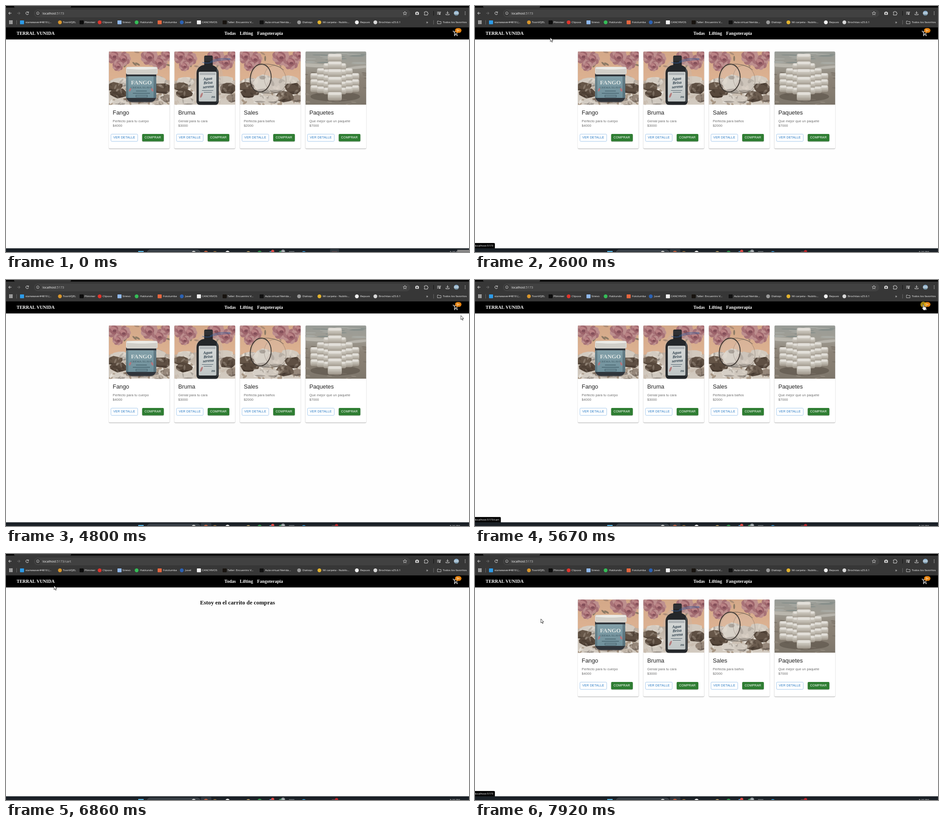
An HTML page with a canvas for the animation above (7.99 s loop, 1026 px wide and 546 px high).

```html
<!DOCTYPE html>
<html lang="es">
<head>
<meta charset="utf-8">
<title>Tienda</title>
<style>
html, body { margin: 0; width: 100%; height: 100%; overflow: hidden; background: #fff; }
canvas { display: block; width: 1026px; height: 546px; }
</style>
</head>
<body>
<canvas id="stage" width="1026" height="546"></canvas>
<script>
const W = 1026, H = 546, LOOP = 7990, STEP = LOOP / 120;
const UI = '"Open Sans", "Noto Sans", sans-serif';
const SANS = '"Liberation Sans", Arial, sans-serif';
const SERIF = '"Liberation Serif", "Times New Roman", serif';
const stage = document.getElementById('stage').getContext('2d');
let g = stage;

function box(x, y, w, h, fill, r = 0, stroke) {
  g.beginPath();
  g.roundRect(x, y, w, h, r);
  if (fill) { g.fillStyle = fill; g.fill(); }
  if (stroke) { g.strokeStyle = stroke; g.stroke(); }
}

function oval(x, y, rx, ry, fill, turn = 0, stroke) {
  g.beginPath();
  g.ellipse(x, y, rx, ry, turn, 0, 7);
  if (fill) { g.fillStyle = fill; g.fill(); }
  if (stroke) { g.strokeStyle = stroke; g.stroke(); }
}

const dot = (x, y, r, fill, stroke) => oval(x, y, r, r, fill, 0, stroke);

function line(d, color, width = 1) {
  g.strokeStyle = color;
  g.lineWidth = width;
  g.stroke(new Path2D(d));
}

function text(s, x, y, font, color, align = 'left', gap = 0) {
  g.font = font;
  g.letterSpacing = gap + 'px';
  g.textAlign = align;
  g.fillStyle = color;
  g.fillText(s, x, y);
  g.letterSpacing = '0px';
}

function fade(y0, y1, ...colors) {
  const f = g.createLinearGradient(0, y0, 0, y1);
  colors.forEach((c, i) => f.addColorStop(i / (colors.length - 1), c));
  return f;
}

function seeded(seed) {
  return () => (seed = (seed * 16807) % 2147483647) / 2147483647;
}

// Product pictures, drawn in a 135 x 118 area

function rose(x, y, r) {
  for (let i = 0; i < 9; i++) {
    const a = i * 0.7;
    oval(x + Math.cos(a) * r * 0.55, y + Math.sin(a) * r * 0.5, r * 0.5, r * 0.42,
      i % 2 ? '#a87378' : '#bd8f8e', a);
  }
  dot(x, y, r * 0.55, '#9d646b');
  oval(x - 1, y - 2, r * 0.45, r * 0.28, '#b98184', 0.5);
  oval(x + 1, y + 2, r * 0.25, r * 0.18, '#85505a');
}

function rock(x, y, rx, ry, color, seed) {
  const rnd = seeded(seed * 971 + 7);
  g.beginPath();
  for (let i = 0; i < 11; i++) {
    const a = i * Math.PI / 5.5, k = 0.82 + rnd() * 0.28;
    g.lineTo(x + Math.cos(a) * rx * k, y + Math.sin(a) * ry * k);
  }
  g.fillStyle = color;
  g.fill();
  g.save();
  g.clip();
  for (let i = 0; i < 8; i++)
    oval(x + (rnd() - 0.5) * rx * 2, y + (rnd() - 0.5) * ry * 2, rx * 0.3, ry * 0.2,
      i % 2 ? 'rgba(255,245,230,.2)' : 'rgba(20,14,10,.16)', rnd() * 3);
  oval(x, y + ry, rx, ry * 0.5, 'rgba(25,18,12,.25)');
  g.restore();
}

function tableScene(seed, shift) {
  const rnd = seeded(seed);
  box(0, 0, 135, 118, fade(0, 118, '#d3a888', '#dcb191', '#c09c80'));
  for (let i = 0; i < 12; i++)
    oval(rnd() * 135, rnd() * 34, 6, 2, i % 2 ? '#8c7a65' : '#ad8d77', rnd() * 3);
  rose(12 + shift, 10, 18);
  rose(32 + shift, 16, 16);
  rose(20 + shift, 32, 12);
  rose(90 + shift, 12, 19);
  rose(112 + shift, 24, 17);
  rose(130 + shift, 8, 14);
  g.beginPath();
  g.moveTo(0, 65);
  g.quadraticCurveTo(67, 54, 135, 64);
  g.lineTo(135, 118);
  g.lineTo(0, 118);
  g.fillStyle = fade(58, 118, '#b8a797', '#cdc3b7', '#d3cbc1');
  g.fill();
  for (let i = 0; i < 90; i++)
    oval(rnd() * 135, 64 + rnd() * 54, 2 + rnd() * 5, 1 + rnd() * 2,
      ['#e6e1d9', '#a79684', '#c9bdb0'][i % 3], rnd() * 3);
  rock(24, 68, 22, 11, '#d3cbc1', seed);
  rock(110, 65, 21, 12, '#d2c9be', seed + 4);
  rock(13, 78, 19, 10, '#665648', seed + 1);
  rock(22, 93, 20, 11, '#57483c', seed + 2);
  rock(118, 82, 20, 13, '#5e4f43', seed + 3);
  rock(128, 104, 14, 9, '#96877a', seed + 5);
}

function jar() {
  tableScene(31, 0);
  oval(72, 107, 39, 8, 'rgba(40,28,20,.35)');
  box(38, 44, 67, 68, '#30353b', [4, 4, 13, 13]);
  box(38, 55, 67, 48, fade(55, 103, '#829fa8', '#6f909b'), 2);
  box(38, 55, 5, 48, 'rgba(30,45,55,.25)');
  box(99, 55, 6, 48, 'rgba(30,45,55,.3)');
  box(38, 34, 70, 17, '#dad8d2', 4);
  for (let x = 41; x < 107; x += 3) box(x, 39, 0.8, 11, '#b9b8b2');
  oval(73, 37, 34, 3, '#ecebe6');
  text('FANGO', 72, 73, 'bold 13px ' + SERIF, '#e3e8e6', 'center');
  text('CREMA SUAVE', 72, 82, '6.8px ' + SERIF, '#3c5661', 'center');
  box(60, 87, 24, 1.2, '#405b66');
  box(53, 92, 38, 1.2, '#405b66');
  box(60, 97, 25, 4, null, 0, '#465f69');
  oval(47, 85, 2, 4, '#b8747a', 0.4);
  oval(96, 85, 2, 4, '#b8747a', -0.4);
  rock(24, 112, 16, 7, '#d3ccc3', 8);
  rock(110, 114, 14, 6, '#c1b5a8', 9);
}

function bottle() {
  tableScene(57, 2);
  oval(75, 67, 33, 55, 'rgba(195,183,173,.3)', 0.08);
  box(66, 9, 19, 25, '#25272a', 3);
  for (let x = 68; x < 84; x += 3) box(x, 11, 0.8, 10, '#4a4b4e');
  box(49, 30, 49, 89, '#24272a', [18, 18, 8, 8]);
  box(54, 45, 39, 66, fade(45, 111, '#d6d9d8', '#c0c6c6'), 2);
  box(94, 37, 2, 75, 'rgba(210,220,225,.3)', 1);
  line('M62 24 Q74 28 85 23 T124 18 M79 23 Q96 13 124 16', '#315e9f', 1);
  line('M56 48 H91 M56 51 H91', '#56616a', 0.8);
  g.save();
  g.translate(74, 63);
  g.rotate(-0.08);
  ['Agua', 'Brisa', 'serena'].forEach((s, i) =>
    text(s, 0, i * 9, 'italic bold 9px ' + SERIF, '#293b48', 'center'));
  g.restore();
  box(61, 86, 25, 1, '#51616c');
  box(65, 90, 18, 1, '#51616c');
  oval(60, 97, 2, 6, '#b57c7c', 0.4);
  text('250', 86, 103, 'bold 5px ' + SANS, '#34444e', 'center');
  rock(30, 111, 17, 8, '#d0c9c0', 12);
}

function lens() {
  tableScene(93, 1);
  rock(54, 72, 24, 21, '#d6d0c7', 5);
  rock(80, 76, 22, 18, '#cac2b8', 15);
  rock(44, 105, 17, 9, '#d6cfc6', 18);
  rock(100, 100, 22, 12, '#6b5c4f', 22);
  rock(72, 106, 15, 9, '#cfc7bd', 27);
  g.lineWidth = 0.8;
  oval(78, 61, 24, 30, 'rgba(215,206,196,.2)', -0.2, 'rgba(95,82,70,.55)');
  g.lineWidth = 2;
  oval(46, 59, 23, 31, 'rgba(220,211,202,.2)', 0.13, '#39342f');
  g.lineWidth = 0.6;
  oval(47, 59, 21, 29, null, 0.13, '#a89b90');
  line('M49 28 Q80 26 97 41 M47 90 Q74 97 91 87', '#665d54', 1);
}

function cube(x, y, w, h) {
  box(x - w / 2, y, w, h, fade(y, y + h, '#d9d6cf', '#c3beb4', '#9b9387'), 4);
  box(x - w / 2 + 2, y + 1, w - 4, h * 0.28, '#e2dfd9', 3);
}

function cubes() {
  box(0, 0, 135, 118, fade(0, 118, '#989c97', '#a09d94', '#8b8276', '#867d71', '#7d766b'));
  const rnd = seeded(44);
  for (let i = 0; i < 22; i++)
    oval(rnd() * 135, 3 + rnd() * 25, 16, 1.2, i % 2 ? '#a9aba5' : '#858d89');
  oval(20, 31, 38, 4, '#b9b6ad', 0.05);
  oval(118, 35, 28, 3, '#b7b4ac', -0.1);
  for (let i = 0; i < 50; i++)
    oval(rnd() * 135, 45 + rnd() * 73, 6, 1.3, i % 2 ? '#90877b' : '#7b7368', 0.1);
  oval(66, 100, 55, 11, 'rgba(60,53,44,.35)');
  // Each column further out starts lower and ends higher
  for (let k = 3; k > 0; k--)
    for (const side of [-1, 1])
      for (let row = 0; row < 6 - k; row++)
        cube(65 + side * k * 14.5, 15 + k * 11 + row * 13.5, 21, 15);
  for (let y = 5; y < 95; y += 17) cube(65, y, 31, 19);
}

// Browser frame

function marks() {
  const font = '6.1px ' + UI;
  const items = [
    [31, 43, 'starweaver#4810 (...', '#2d9be8', 1],
    [115, 126, 'ToonVQEL', '#d9962c'],
    [163, 174, 'Plimmer', '#0b0b0b', 1],
    [203, 214, 'Clipuva', '#e0342b'],
    [247, 258, 'Strevo', '#8fb9ee', 1],
    [285, 297, 'Hablundo', '#35bd57'],
    [336, 348, 'Fotolumba', '#e5673f', 1],
    [385, 397, 'Juvel', '#2c62b4'],
    [423, 434, 'CANCHIVOS', '#f1f1f1', 1],
    [480, 491, 'Taller: Encuentro V...', '#17130f', 1],
    [562, 574, 'Aula virtual Nerida...', '#101010', 1],
    [645, 657, 'Dialoqo', '#9a9a9a'],
    [690, 702, 'Mi carpeta - Nubilo...', '#e3b32e'],
    [773, 785, 'Repuvo', '#f2f2f2'],
    [814, 826, 'Brochitas v25.0.1', '#d8d8d8']
  ];
  for (const [ix, tx, label, color, square] of items) {
    if (square) box(ix, 32, 9, 8.5, color, 1);
    else dot(ix + 4.5, 36.3, 4.2, color);
    text(label, tx, 38.2, font, '#fff');
  }
  text('»', 931, 38.5, '9px ' + UI, '#e8e8e8');
  line('M956 33.5 h3 l1 1 h4 v5 h-8 z', '#dcdcdc', 0.8);
  text('Todos los favoritos', 968, 38.2, font, '#fff');
}

function chrome(path) {
  box(0, 0, W, 48, '#373737');
  box(0, 0, W, 3.5, '#060606');
  box(18, 0, 126, 4, '#373737', [0, 0, 3, 3]);
  box(62, 8, 834, 17, '#414141', 8.5);
  line('M12 16 H6 M8.8 13 L5.8 16 L8.8 19', '#f0f0f0');
  line('M25 16 H31 M28.2 13 L31.2 16 L28.2 19', '#777');
  line('M49.4 14 A3.1 3.1 0 1 0 50 17 M50 12.5 V14.8 H47.6', '#f0f0f0');
  dot(70.5, 16, 5.5, '#2c2c2c');
  g.lineWidth = 0.8;
  dot(70.5, 16, 3.2, null, '#e8e8e8');
  line('M70.5 15.5 V18 M70.5 13.8 V14.6', '#e8e8e8', 0.9);
  text('localhost', 81, 18.5, '7.1px ' + UI, '#fff');
  const w = g.measureText('localhost').width;
  text(':5173' + path, 81 + w, 18.5, '7.1px ' + UI, '#c4c4c4');
  line('M884 12 l1.2 2.7 2.9.3 -2.2 1.9.7 2.9 -2.6-1.5 -2.6 1.5.7-2.9 -2.2-1.9 2.9-.3z', '#dedede', 0.8);
  box(907, 13.5, 8, 6, '#d6d6d6', 1);
  box(909.3, 12.4, 3.4, 2, '#d6d6d6', 0.5);
  dot(911, 16.5, 1.7, '#4b4b4b');
  line('M927 13.3 h2.3 a1.4 1.4 0 0 1 2.8 0 h2 v2 a1.4 1.4 0 0 1 0 2.8 v2 h-7 v-2.3 a1.3 1.3 0 0 0 0-2.4z', '#e2e2e2');
  line('M947.5 11 V21', '#111');
  line('M955.5 13.5 h6 M955.5 15.8 h6 M955.5 18.1 h3 M962 18 v-4.5 h2', '#dedede');
  dot(961, 18.2, 1.4, '#dedede');
  line('M978.5 11.8 v5 M976 14.6 l2.5 2.5 2.5-2.5 M974.8 17.5 v2 h7.4 v-2', '#e2e2e2');
  dot(998, 16, 5.5, fade(10, 22, '#6f9cc4', '#bed2df', '#4a6c82'));
  for (let y = 13; y < 20; y += 3) dot(1017.5, y, 0.8, '#e2e2e2');
  for (let i = 0; i < 6; i++)
    box(7.4 + (i % 2) * 4, 32.4 + Math.floor(i / 2) * 2.8, 2.8, 1.6, null, 0, '#cfcfcf');
  line('M23.5 31.5 V41 M947.5 31.5 V41', '#686868');
  marks();
}

function header() {
  box(0, 47.5, W, 26.7, '#000');
  const font = 'bold 10px ' + SERIF;
  text('TERRAL VUNIDA', 23.5, 64.2, font, '#fff');
  text('Todas', 484, 64.2, font, '#fff');
  text('Lifting', 518, 64.2, font, '#fff');
  text('Fangoterapia', 556.5, 64.2, font, '#fff');
  line('M989.8 55.8 h2 l3 6 h4 l2.4-4.4 M992.6 57.4 h8.6 M994.8 61.8 l-1.2 2 h7.2', '#fff', 1.1);
  dot(994.2, 65.6, 1.1, '#fff');
  dot(999.6, 65.6, 1.1, '#fff');
  box(995, 49, 14.3, 10.6, '#e5820f', 5.3);
  text('9+', 1002.1, 56.8, '6.4px ' + SANS, '#fff', 'center');
}

function detailButton(x, hover) {
  g.lineWidth = 0.8;
  box(x + 4.6, 284.4, 59.2, 16, hover ? '#f3f8fd' : '#fff', 2, hover ? '#1976d2' : '#8cbae8');
  text('VER DETALLE', x + 9.7, 294.4, '6.94px ' + SANS, '#2579c4', 'left', 0.19);
}

const cardX = i => 228 + i * 145.2;

// A panel with a soft shadow below it
function raised(x, y, w, h, fill, r, dark) {
  g.save();
  g.shadowColor = `rgba(0,0,0,${dark})`;
  g.shadowBlur = 1.5;
  g.shadowOffsetY = 0.9;
  box(x, y, w, h, fill, r);
  g.restore();
}

function card(i, name, about, price, picture) {
  const x = cardX(i);
  raised(x, 101, 134.5, 215.3, '#fff', 2.2, 0.34);
  g.save();
  g.beginPath();
  g.roundRect(x, 101, 134.5, 118.5, [2.2, 2.2, 0, 0]);
  g.clip();
  g.translate(x, 101);
  picture();
  g.restore();
  text(name, x + 8.6, 241.2, '12.8px ' + SANS, '#212121');
  text(about, x + 8.6, 257.6, '7.48px ' + SANS, '#6b6b6b', 'left', 0.08);
  text(price, x + 8.6, 268.4, '7.48px ' + SANS, '#6b6b6b', 'left', 0.08);
  detailButton(x, false);
  raised(x + 73.7, 284, 48, 16.6, '#2e7d32', 2, 0.25);
  text('COMPRAR', x + 79, 294.4, '6.94px ' + SANS, '#fff', 'left', 0.19);
}

function layer(paint) {
  const c = document.createElement('canvas');
  c.width = W;
  c.height = H;
  g = c.getContext('2d');
  box(0, 0, W, H, '#fefefe');
  paint();
  g = stage;
  return c;
}

const home = layer(() => {
  chrome('');
  header();
  card(0, 'Fango', 'Perfecto para tu cuerpo', '$4000', jar);
  card(1, 'Bruma', 'Genial para tu cara', '$3000', bottle);
  card(2, 'Sales', 'Perfecta para baños', '$2000', lens);
  card(3, 'Paquetes', 'Que mejor que un paquete', '$7000', cubes);
});

const cart = layer(() => {
  chrome('/cart');
  header();
  text('Estoy en el carrito de compras', 513, 112.4, 'bold 12.8px ' + SERIF, '#111', 'center');
});

function taskbar(t) {
  box(0, 537.8, W, 8.2, '#1b2127');
  box(293, 543.8, 12, 3, '#59b9e8');
  box(313, 541.6, 117, 12, '#343b42', 6, '#515960');
  dot(416, 548, 4.5, '#cfd0cc');
  if (t > 2030) box(432, 539, 23, 12, '#303840', 2);
  else box(718, 539, 20, 12, '#303840', 2);
  [[443, '#b75a3c'], [463, '#8a6538'], [491, '#ececec'], [537, '#b49a61'],
    [562, '#299447'], [587, '#4f93c9'], [609, '#38985c'], [660, '#328ac1']]
    .forEach(([x, c], i) => dot(x, i % 2 ? 549 : 548.3, 5, c));
  dot(591, 544.5, 3.4, '#d94a45');
  dot(614, 545, 4.5, '#8b9297');
  text('26', 614, 547, '5px ' + UI, '#fff', 'center');
  box(627, 544, 12, 4, '#565d62');
  box(722, 544.5, 12, 3, '#5a4446');
  if (t > 130) dot(732.5, 545, 3.4, '#b52228');
  text('5:20 PM', 1006, 548, '6px ' + UI, '#eee', 'right');
  if (t < 60) box(1000, 541, 26, 5, '#858585');
}

// Pointer: time, x, y
const path = [
  [0, 1013, 548], [60, 1013, 548], [330, 800, 360], [600, 390, 155], [860, 120, 66],
  [920, 118, 66], [1200, 84, 60], [1390, 69.5, 61.5], [2330, 69.5, 61.5],
  [2600, 168, 70], [2860, 289, 112], [3130, 250, 110], [3400, 199, 170],
  [3660, 252, 266], [3860, 285.5, 296.5], [4000, 285.5, 296.5],
  [4260, 450, 240], [4530, 830, 118], [4800, 1012, 78], [4900, 1012, 78],
  [5260, 993.5, 54.5], [5940, 993.5, 54.5], [6200, 720, 150], [6460, 330, 130],
  [6730, 133, 78], [6860, 106, 70], [7130, 88.5, 66], [7600, 88.5, 66], [7915, 146, 144]
];

function pointer(t) {
  const n = path.findIndex(p => p[0] > t);
  if (n < 0) return path[path.length - 1].slice(1);
  const [t0, x0, y0] = path[n - 1], [t1, x1, y1] = path[n];
  const k = (t - t0) / (t1 - t0);
  return [x0 + (x1 - x0) * k, y0 + (y1 - y0) * k];
}

const inside = (x, y, l, top, r, b) => x >= l && x <= r && y >= top && y <= b;

const arrow = new Path2D('M0 0 V9 L2.1 7.1 L3.6 10.4 L5 9.8 L3.5 6.6 H6.3 Z');
const hand = new Path2D('M-1.1 .8 Q0 -.8 1.1 .8 V4.2 Q2.4 3.6 3 4.7 Q4.2 4.2 4.8 5.2 Q6.2 5 6.2 6.5 ' +
  'V9 Q6 10.5 5 11.3 V12.6 H-.2 V11.5 L-3.1 7.8 Q-3.3 6.2 -1.1 7.4 Z');

function drawPointer(x, y, link) {
  g.save();
  g.translate(x, y);
  const shape = link ? hand : arrow;
  g.fillStyle = '#fff';
  g.strokeStyle = '#111';
  g.lineWidth = 0.8;
  g.lineJoin = 'round';
  g.fill(shape);
  g.stroke(shape);
  if (link) line('M1.1 4.2 V6.5 M3 4.7 V6.8 M4.8 5.2 V7', '#111', 0.5);
  g.restore();
}

function status(s) {
  g.font = '6.1px ' + UI;
  const w = g.measureText(s).width;
  box(0, 526, w + 3, 12, '#050505', [0, 2, 0, 0]);
  text(s, -0.5, 534.2, g.font, '#fff');
}

const statuses = [
  [1650, 2780, ''], [4050, 4460, '/detalle/1'], [5250, 6250, '/cart'], [7180, LOOP, '']
];
const clicks = [[1980, 2120], [5590, 5790], [7510, 7650]];

function draw(now) {
  const t = Math.floor((now % LOOP + 8) / STEP) * STEP;
  const inCart = t >= 5780 && t < 7650;
  const [x, y] = pointer(t);
  g.drawImage(inCart ? cart : home, 0, 0);
  let link = inside(x, y, 23, 55, 110, 67) || inside(x, y, 484, 55, 616, 67) ||
    inside(x, y, 988, 49, 1010, 68);
  if (!inCart) for (let i = 0; i < 4; i++) {
    const cx = cardX(i);
    if (inside(x, y, cx + 4.5, 284, cx + 64, 300.5)) {
      link = true;
      detailButton(cx, true);
    }
  }
  const tip = statuses.find(s => t >= s[0] && t < s[1]);
  if (tip) status('localhost:5173' + tip[2]);
  taskbar(t);
  if (clicks.some(c => t >= c[0] && t < c[1])) dot(x, y, 6.5, 'rgba(225,185,25,.72)');
  if (t > 60) drawPointer(x, y, link);
}

const start = performance.now();
function frame() {
  draw(performance.now() - start);
  requestAnimationFrame(frame);
}
frame();
</script>
</body>
</html>
```
